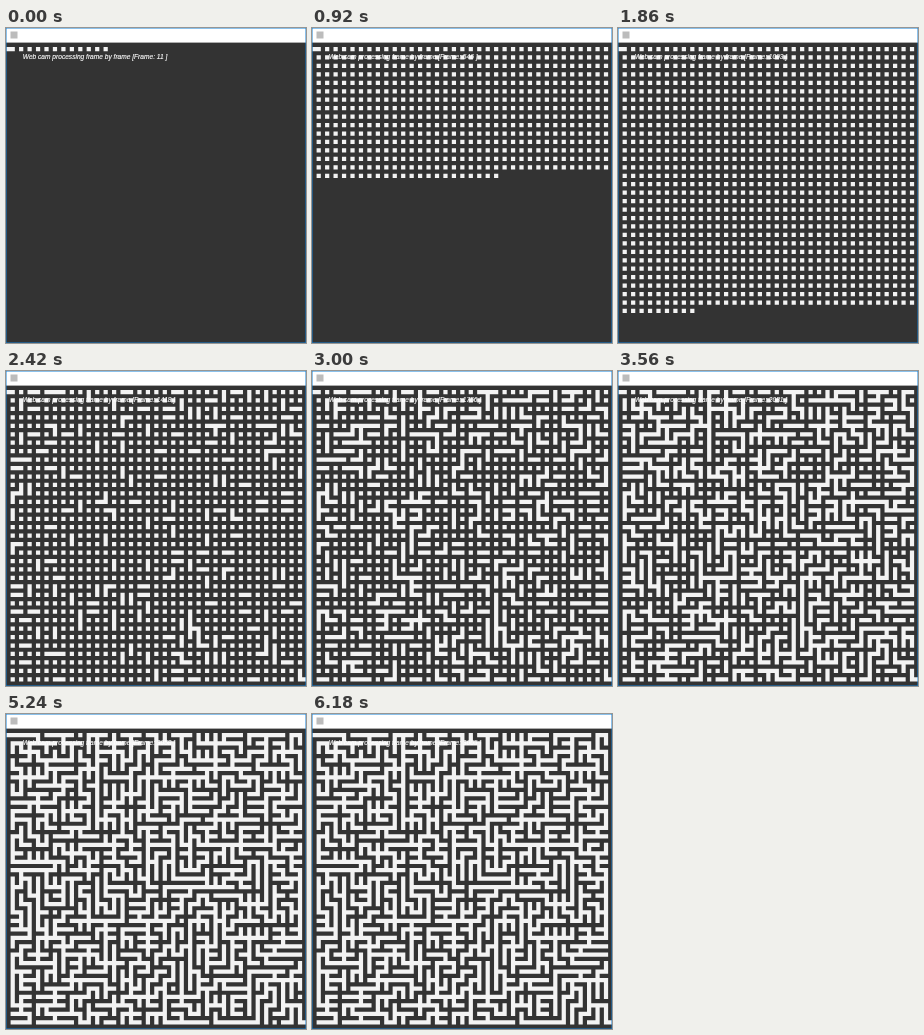
Recreate the animation shown at these times as an HTML page with a canvas. Size 300 by 315 pixels, loop 7.88 s.

```html
<!DOCTYPE html>
<html lang="en">
<head>
<meta charset="utf-8">
<title>Maze generation</title>
<style>
  html, body { margin: 0; width: 100%; height: 100%; overflow: hidden; background: #fff; }
  canvas { display: block; width: 300px; height: 315px; }
</style>
</head>
<body>
<canvas id="stage"></canvas>
<script>
const WIDTH = 300, HEIGHT = 315;
const SIZE = 35;                 // cells per side
const PITCH = 8.45, CELL = PITCH / 2;
const LEFT = 4.6, TOP = 18.9;    // corner of the first cell
const LOOP = 7880, STEP = 20, LAST_STEP = 309;
const FIRST_COUNT = 11, LAST_COUNT = 3605;

const canvas = document.getElementById('stage');
const ctx = canvas.getContext('2d');
const ratio = window.devicePixelRatio || 1;
canvas.width = WIDTH * ratio;
canvas.height = HEIGHT * ratio;
ctx.scale(ratio, ratio);

function seededRandom(seed) {
  return () => {
    seed = (seed + 0x6D2B79F5) | 0;
    let t = Math.imul(seed ^ (seed >>> 15), 1 | seed);
    t = (t + Math.imul(t ^ (t >>> 7), 61 | t)) ^ t;
    return ((t ^ (t >>> 14)) >>> 0) / 4294967296;
  };
}

function shuffle(list, random) {
  for (let i = list.length - 1; i > 0; i--) {
    const j = Math.floor(random() * (i + 1));
    [list[i], list[j]] = [list[j], list[i]];
  }
  return list;
}

function cellRect(index, across = 1, down = 1) {
  return [
    LEFT + (index % SIZE) * PITCH,
    TOP + Math.floor(index / SIZE) * PITCH,
    CELL * across,
    CELL * down
  ];
}

// One entry per tick: cells in reading order, then every wall in random order.
// A wall that would close a cycle stays up and leaves a null entry.
function buildTicks() {
  const total = SIZE * SIZE;
  const ticks = [], walls = [];
  const parent = [];
  for (let i = 0; i < total; i++) {
    parent.push(i);
    ticks.push(cellRect(i));
    if (i % SIZE < SIZE - 1) walls.push([i, i + 1]);
    if (i + SIZE < total) walls.push([i, i + SIZE]);
  }
  const entrance = ticks[0], exit = ticks[total - 1];
  entrance[0] -= CELL;
  entrance[2] += CELL;
  exit[2] += CELL;

  const root = i => {
    while (parent[i] !== i) i = parent[i] = parent[parent[i]];
    return i;
  };
  for (const [a, b] of shuffle(walls, seededRandom(35))) {
    const ra = root(a), rb = root(b);
    if (ra === rb) {
      ticks.push(null);
      continue;
    }
    parent[ra] = rb;
    ticks.push(b === a + 1 ? cellRect(a, 3, 1) : cellRect(a, 1, 3));
  }
  return ticks;
}

const ticks = buildTicks();

function drawWindow() {
  ctx.fillStyle = '#fff';
  ctx.fillRect(0, 0, WIDTH, HEIGHT);
  ctx.fillStyle = '#bcbcbc';
  ctx.fillRect(4.5, 3.5, 7, 7);
  ctx.fillStyle = '#333';
  ctx.fillRect(0, 14.6, WIDTH, HEIGHT - 14.6);
}

function drawBorder() {
  ctx.strokeStyle = '#1883d7';
  ctx.lineWidth = 0.5;
  ctx.strokeRect(0.25, 0.25, WIDTH - 0.5, HEIGHT - 0.5);
}

function drawMaze(count) {
  ctx.beginPath();
  for (const rect of ticks.slice(0, count + 1)) {
    if (rect) ctx.rect(...rect);
  }
  ctx.fillStyle = '#f3f3f3';
  ctx.fill();
}

function drawCaption(count) {
  const text = `Web cam processing frame by frame [Frame: ${count} ]`;
  ctx.font = 'italic 6.6px "Liberation Sans", Arial, sans-serif';
  ctx.fillStyle = ctx.strokeStyle = '#fff';
  ctx.lineWidth = 0.15;
  ctx.fillText(text, 16.8, 31);
  ctx.strokeText(text, 16.8, 31);
}

function draw(time) {
  const step = Math.min(LAST_STEP, Math.floor((time % LOOP) / STEP));
  const count = Math.round(FIRST_COUNT + (LAST_COUNT - FIRST_COUNT) * step / LAST_STEP);
  drawWindow();
  drawMaze(count);
  drawBorder();
  drawCaption(count);
}

const start = performance.now();
function play() {
  draw(performance.now() - start);
  requestAnimationFrame(play);
}
play();
</script>
</body>
</html>
```
